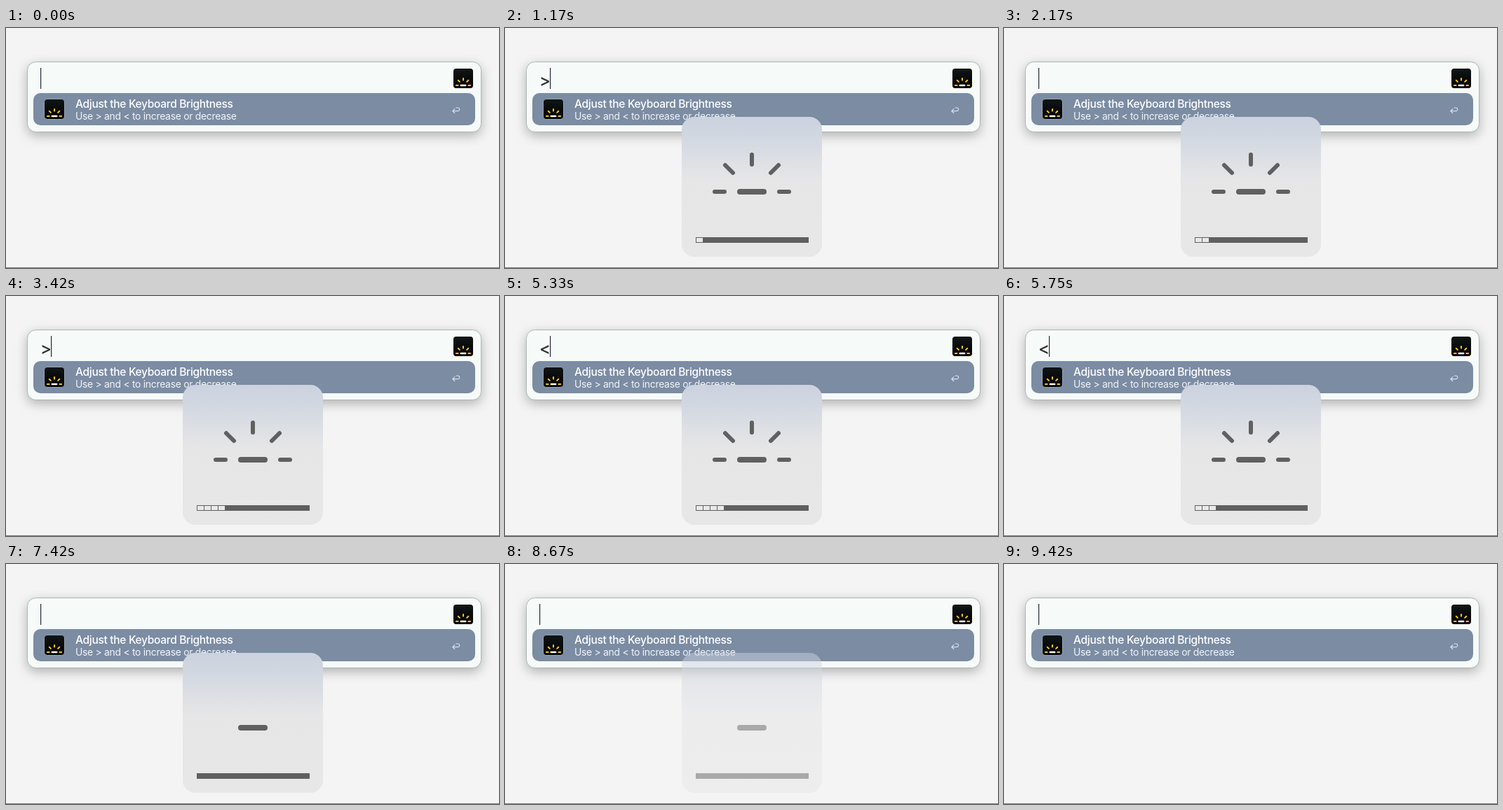
Write an HTML page that moves like this. It is 703 px wide and 343 px high and loops after 9660 ms.

```html
<!DOCTYPE html>
<html lang="en">
<head>
<meta charset="utf-8">
<title>Keyboard brightness</title>
<style>
  html, body { margin: 0; width: 100%; height: 100%; overflow: hidden; background: #f4f4f4; }
  svg { display: block; width: 703px; height: 343px; }
  text { font-family: Inter, "Open Sans", sans-serif; }
  .window { fill: #f6fbf9; stroke: #aeb4b5; filter: drop-shadow(0 5px 8px rgba(0, 0, 0, .27)); }
  .title { font-size: 15.5px; font-weight: 500; letter-spacing: -.02em; fill: #fff; }
  .subtitle { font-size: 13.9px; letter-spacing: -.02em; fill: #f2f5f8; }
  .query { font-size: 24px; font-weight: 500; fill: #333; }
  .return { fill: none; stroke: #d8dfe7; stroke-width: 1.2; stroke-linecap: round; stroke-linejoin: round; }
  .rays, .key { fill: none; stroke-linecap: round; }
</style>
</head>
<body>
<svg viewBox="0 0 703 343">
  <defs>
    <linearGradient id="glass" x2="0" y2="1">
      <stop offset="0" stop-color="#cbd2df"/>
      <stop offset=".15" stop-color="#d2d8e1"/>
      <stop offset=".45" stop-color="#e6e6e7"/>
      <stop offset="1" stop-color="#e7e7e7"/>
    </linearGradient>
    <linearGradient id="black" x2="0" y2="1">
      <stop offset="0" stop-color="#111617"/>
      <stop offset="1" stop-color="#000"/>
    </linearGradient>
    <path id="rays" class="rays" d="M-53 0h14M39 0h14M0-53v14M-38-38l11 11M38-38l-11 11"/>
    <path id="key" class="key" d="M-17 0h34"/>
    <g id="icon">
      <rect width="28" height="28" rx="4" fill="url(#black)"/>
      <g transform="translate(14 24) scale(.19)">
        <use href="#rays" stroke="#f8c51c" stroke-width="11"/>
        <use href="#key" stroke="#fff" stroke-width="13"/>
      </g>
    </g>
  </defs>

  <rect width="703" height="343" fill="#f4f4f4"/>
  <rect y="342" width="703" height="1" fill="#777"/>
  <rect class="window" x="30.5" y="48.5" width="647" height="100" rx="12"/>
  <use href="#icon" x="638" y="58"/>
  <text class="query" id="query" x="49" y="83"></text>
  <rect id="caret" y="57" width="1.2" height="30" fill="#252b36"/>

  <rect x="39" y="93" width="630" height="46" rx="10" fill="#7b8ca3"/>
  <rect x="54.5" y="101.5" width="29" height="29" rx="4.5" fill="#b3bcc8"/>
  <use href="#icon" x="55" y="102"/>
  <text class="title" x="99" y="114">Adjust the Keyboard Brightness</text>
  <text class="subtitle" x="99" y="131">Use &gt; and &lt; to increase or decrease</text>
  <path class="return" d="M642 114h2.4a2.3 2.3 0 0 1 0 4.6h-7.6m3-2.9-3 2.9 3 2.9"/>

  <g id="panel">
    <rect x="252" y="127" width="200" height="200" rx="18" fill="url(#glass)"/>
    <g transform="translate(352 234)" stroke="#606060">
      <use id="glow" href="#rays" stroke-width="6"/>
      <use href="#key" stroke-width="8"/>
    </g>
    <rect x="272" y="299" width="161" height="8" fill="#606060"/>
    <path id="level" fill="#e9e9e9"/>
  </g>
</svg>
<script>
const LOOP = 9660, BLINK = 500;
const PANEL_IN = 1170, FADE_START = 8410, FADE_STEPS = 8, FPS = 12;

// Each key press: [typed, level changes, query clears, character, new level]
const presses = [
  [830, 1170, 1250, '>', 1],
  [1750, 2080, 2170, '>', 2],
  [2420, 2920, 3000, '>', 3],
  [3080, 3420, 3500, '>', 4],
  [3670, 4000, 4080, '>', 5],
  [4750, 5080, 5170, '<', 4],
  [5330, 5750, 5830, '<', 3],
  [5920, 6080, 6170, '<', 2],
  [6420, 6830, 6920, '<', 1],
  [7000, 7420, 7420, '<', 0],
];

const [query, caret, panel, glow, level] =
  ['query', 'caret', 'panel', 'glow', 'level'].map(id => document.getElementById(id));

function stateAt(t) {
  const state = { text: '', level: 0, edited: 0 };
  for (const [typed, changed, cleared, char, value] of presses) {
    if (t >= typed) { state.text = char; state.edited = typed; }
    if (t >= changed) state.level = value;
    if (t >= cleared) { state.text = ''; state.edited = cleared; }
  }
  return state;
}

function panelOpacity(t) {
  if (t < PANEL_IN) return 0;
  if (t < FADE_START) return 1;
  const step = Math.floor((t - FADE_START) * FPS / 1000) + 1;
  return Math.max(0, 1 - step / FADE_STEPS);
}

function draw(t) {
  const state = stateAt(t);
  query.textContent = state.text;
  caret.setAttribute('x', state.text ? 64 : 49);
  caret.setAttribute('opacity', Math.floor((t - state.edited) / BLINK) % 2 ? 0 : 1);
  panel.setAttribute('opacity', panelOpacity(t));
  glow.setAttribute('opacity', state.level ? 1 : 0);
  level.setAttribute('d', Array.from({ length: state.level },
    (_, i) => `M${273 + 10 * i} 300h9v6h-9z`).join(''));
}

const start = performance.now();
function tick() {
  draw((performance.now() - start) % LOOP);
  requestAnimationFrame(tick);
}
tick();
</script>
</body>
</html>
```
